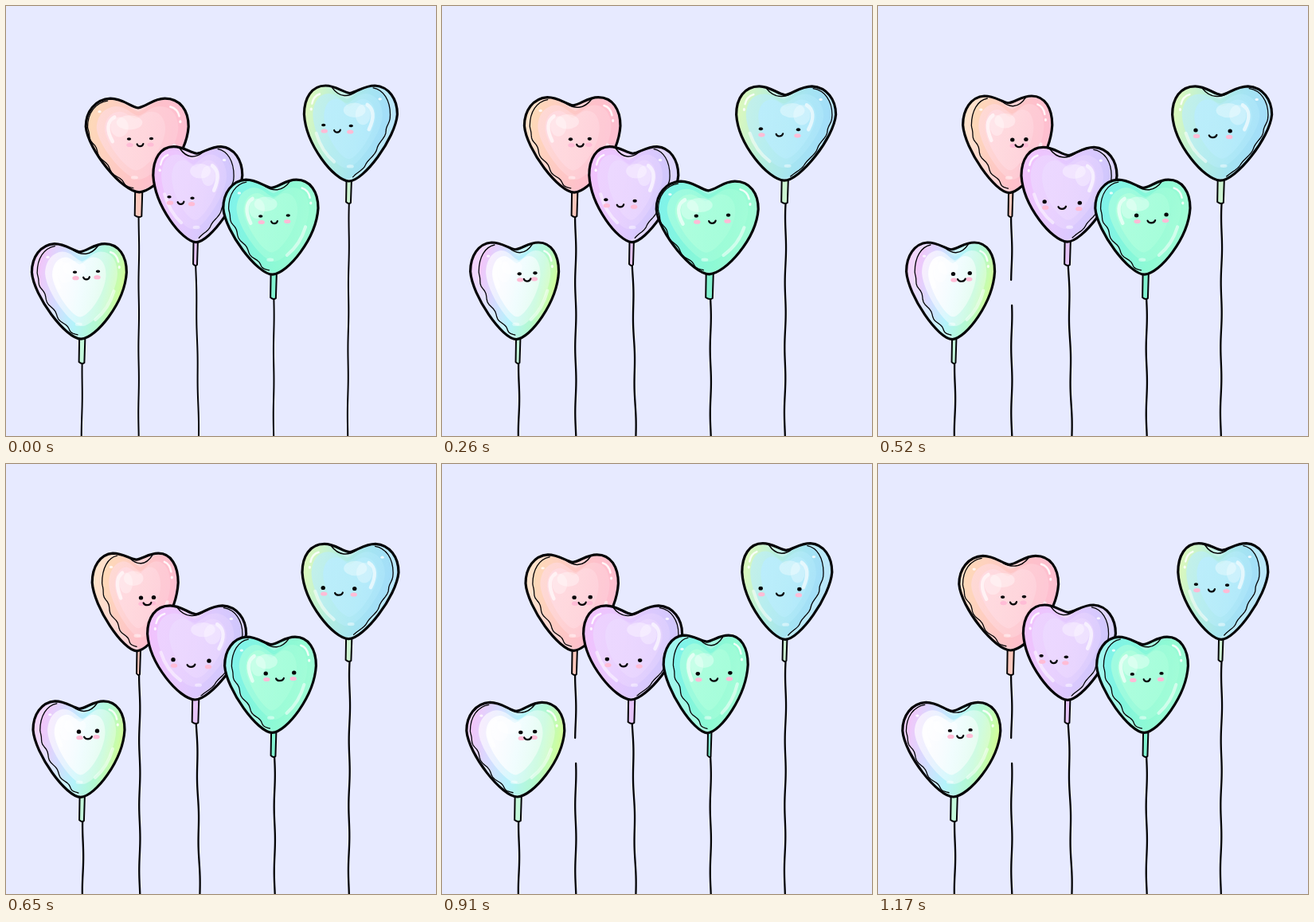
An HTML page with a canvas that plays this animation: 540 px wide and 540 px high, repeating every 1.3 s.

```html
<!DOCTYPE html>
<html lang="en">
<head>
<meta charset="utf-8">
<title>Heart balloons</title>
<style>
  html, body { margin: 0; width: 100%; height: 100%; overflow: hidden; background: #e7eaff; }
  canvas { display: block; width: 540px; height: 540px; }
</style>
</head>
<body>
<canvas id="stage" width="540" height="540"></canvas>
<script>
const ctx = document.getElementById('stage').getContext('2d');
const STEP = 130, STEPS = 10;
const INK = '#050507', SKY = '#e7eaff', BLUSH = '#ffbcd6';

// wide: step at which the balloon faces forward.
// left, right, top, bottom: edges facing forward and turned away.
// eyes, gap, eyeY: mean, swing once per loop, swing twice per loop.
const balloons = [
  { wide: 8, left: [28, 36], right: [157, 145], top: [299, 295], bottom: [419, 420],
    tab: [95.5, 449], lean: -.5, eyes: [105, 1, 3], gap: [22, -3, -4], eyeY: [336, 1, .8], tilt: -1,
    colors: ['#f1c6fa', '#d5dcff', '#b4f3fb', '#b3f9d0', '#d9ff8c'], glow: '255,255,255', tint: '#c3f8da' },
  { wide: 0, left: [99, 107], right: [230, 217], top: [115, 111], bottom: [235, 236],
    tab: [166.5, 265], lean: 0, gapped: true, eyes: [174, 4.5, 1], gap: [22, -6, 0], eyeY: [167.5, .5, 0], tilt: -.5,
    colors: ['#fed9b8', '#fecbc3', '#fec0cb', '#febfd2'], glow: '255,219,226', tint: '#fcc8bd' },
  { wide: 6, flip: true, left: [174, 186], right: [304, 296], top: [177, 175], bottom: [297, 298],
    tab: [238, 326], lean: 4, eyes: [226, 6.5, 0], gap: [38, 8, 1], eyeY: [243.5, 3, .8], tilt: 1.5,
    colors: ['#f1c2fd', '#e8c8ff', '#dac9fe', '#cdc6fc'], glow: '236,217,255', tint: '#e5c4f6' },
  { wide: 2, left: [268, 277], right: [398, 385], top: [219, 214], bottom: [338, 339],
    tab: [336, 368], lean: 0, eyes: [340.5, 3.5, 0], gap: [38, .5, 3], eyeY: [263.5, -.5, 0], tilt: -1,
    colors: ['#80f3ea', '#83f6dc', '#8ffad4', '#a3fdd6'], glow: '176,255,221', tint: '#82f2d0' },
  { wide: 3, flip: true, left: [366, 378], right: [497, 489], top: [100, 98], bottom: [220, 222],
    tab: [430.5, 248], lean: -1.5, eyes: [421, 1, 4], gap: [43, 2.5, 6], eyeY: [154, 3, 1.5], tilt: 1,
    colors: ['#daf8bd', '#b4eedf', '#a5e4f2', '#a2dcfb'], glow: '186,237,253', tint: '#ccf3d1' }
];

const mix = (a, b, t) => a + (b - a) * t;

// Maps unit coordinates into a box, mirrored when flipped.
const mapper = ({ x, y, w, h, flip }) => (u, v) => [x + w * (flip ? 1 - u : u), y + h * v];

function inset(b, l, t, r, bot) {
  if (b.flip) [l, r] = [r, l];
  return { x: b.x + b.w * l, y: b.y + b.h * t, w: b.w * (1 - l - r), h: b.h * (1 - t - bot), flip: b.flip };
}

function trace(at, x, y, ...curves) {
  const path = new Path2D();
  path.moveTo(...at(x, y));
  for (let i = 0; i < curves.length; i += 6) {
    const [a, b, c, d, e, f] = curves.slice(i, i + 6);
    path.bezierCurveTo(...at(a, b), ...at(c, d), ...at(e, f));
  }
  return path;
}

function heart(box, notch) {
  const path = trace(mapper(box), .51, notch,
    .43, notch * .85, .36, 0, .24, 0,
    .09, .01, 0, .14, 0, .3,
    .02, .55, .36, 1, .52, 1,
    .68, .99, .98, .62, 1, .3,
    1, .13, .92, 0, .77, 0,
    .66, 0, .59, notch * .85, .51, notch);
  path.closePath();
  return path;
}

function stroke(path, width, color = INK) {
  ctx.lineWidth = width;
  ctx.strokeStyle = color;
  ctx.stroke(path);
}

function oval(x, y, rx, ry, color) {
  ctx.fillStyle = color;
  ctx.beginPath();
  ctx.ellipse(x, y, rx, ry, 0, 0, Math.PI * 2);
  ctx.fill();
}

function fade(box, colors) {
  const g = ctx.createLinearGradient(box.x, box.y + box.h * .35, box.x + box.w, box.y + box.h * .55);
  colors.forEach((c, i) => g.addColorStop(i / (colors.length - 1), c));
  return g;
}

function fillHeart(box, notch, colors) {
  ctx.fillStyle = fade(box, colors);
  ctx.fill(heart(box, notch));
}

function bezier(t, a, b, c, d) {
  const s = 1 - t;
  return s * s * s * a + 3 * s * s * t * b + 3 * s * t * t * c + t * t * t * d;
}

// Wavy seam along the near edge of the front face.
function drawSeam(box) {
  const at = mapper(box);
  const path = trace(at, .2, .01, .08, .03, 0, .14, 0, .3);
  for (let t = 0; t <= .9; t += .03) {
    const [x, y] = at(bezier(t, 0, .02, .36, .52), bezier(t, .3, .55, 1, 1));
    const wave = Math.sin(t * 30) * 1.3 * Math.min(1, t * 5);
    path.lineTo(x + wave, y - wave * .4);
  }
  stroke(path, 1.3);
}

function drawThread(b, style) {
  const [x, y0] = b.tab, wavy = style > 0;
  const top = x + (wavy ? 1.2 : .4), bottom = x + b.lean + (wavy ? 1.4 : 0);
  const path = new Path2D();
  let pen = false;
  for (let y = y0 - 1; y <= 544; y += 4) {
    const hidden = b.gapped && style === 1 && y > 345 && y < 374;
    const px = mix(top, bottom, (y - y0) / (540 - y0)) + (wavy ? .6 : .3) * Math.sin(y / 13 + x);
    if (!hidden) pen ? path.lineTo(px, y) : path.moveTo(px, y);
    pen = !hidden;
  }
  stroke(path, wavy ? 2.3 : 2);
}

function drawTab(b, turn, foot) {
  const [x, y] = b.tab, r = mix(4.3, 2, turn);
  const path = new Path2D();
  path.moveTo(x - r, foot - 3);
  path.lineTo(x - r - .5, y - 2);
  path.quadraticCurveTo(x, y + 1.5, x + r - .5, y - 1);
  path.lineTo(x + r + .5, foot - 3);
  ctx.fillStyle = b.tint;
  ctx.fill(path);
  stroke(path, 2);
}

function drawShine(box) {
  const at = mapper(box);
  const white = a => `rgba(255,255,255,${a})`;
  const spot = (u, v, rx, ry, a) => oval(...at(u, v), rx, ry, white(a));
  spot(.42, .25, box.w * .13, box.h * .08, .35);
  spot(.32, .3, box.w * .09, box.h * .11, .3);
  stroke(trace(at, .27, .19, .19, .24, .19, .34, .25, .46), 4.5, white(.65));
  stroke(trace(at, .87, .5, .83, .63, .75, .74, .66, .81), 4, white(.55));
  stroke(trace(at, .83, .075, .88, .09, .91, .13, .92, .18), 2.5, white(.85));
  spot(.93, .24, 1.6, 2, .85);
  spot(.12, .13, 2.2, 1.6, .8);
  spot(.47, .86, 4.5, 2.2, .45);
}

function drawFace(b, i) {
  const angle = i / STEPS * Math.PI * 2;
  const once = -Math.cos(angle), twice = -Math.cos(2 * angle);
  const swing = ([mean, a, c]) => mean + a * once + c * twice;
  const x = swing(b.eyes), y = swing(b.eyeY), half = swing(b.gap) / 2;
  for (const side of [-1, 1]) {
    const ey = y + (side > 0 ? b.tilt : 0);
    oval(x + side * (half - 1), ey + 7.5, 4.2, 2.6, BLUSH);
    oval(x + side * half, ey, 2.7, 2.2 + .4 * once, INK);
  }
  const w = 4.4 + .5 * once;
  stroke(trace((u, v) => [x + u * w, y + 8 + v], -1, -1.5, -.7, 2.2, .7, 2.2, 1, -2), 2.2);
}

function drawBalloon(b, i) {
  const away = Math.abs(i - b.wide);
  const turn = Math.min(away, STEPS - away) / (STEPS / 2);
  const [left, right, top, bottom] = [b.left, b.right, b.top, b.bottom].map(([p, q]) => mix(p, q, turn));
  const box = { x: left + 1.2, y: top + 1.2, w: right - left - 2, h: bottom - top - 2.4, flip: b.flip };
  const notch = mix(.1, .065, turn);
  const outline = heart(box, notch);
  const front = inset(box, mix(.018, .115, turn), .015, .012, .02);
  const glow = (a, c) => [a, c].map(alpha => `rgba(${b.glow},${alpha})`);

  drawTab(b, turn, bottom);
  ctx.save();
  ctx.clip(outline);
  fillHeart(box, notch, b.colors);
  fillHeart(box, notch, ['rgba(255,255,255,.25)', 'rgba(255,255,255,.25)']);
  fillHeart(front, .13, b.colors);
  fillHeart(inset(front, .09, .07, .09, .12), .13, glow(.65, .3));
  fillHeart(inset(front, .17, .13, .22, .22), .12, glow(.9, .45));
  drawShine(front);
  drawSeam(front);
  if (turn) stroke(trace(mapper(box), .44, notch * .8, .52, .12, .62, .13, .7, .02), 1.5);
  ctx.restore();
  stroke(outline, 3.2);
  drawFace(b, i);
}

function draw(i) {
  ctx.fillStyle = SKY;
  ctx.fillRect(0, 0, 540, 540);
  balloons.forEach(b => drawThread(b, i % 8 % 3));
  balloons.forEach(b => drawBalloon(b, i));
}

ctx.lineCap = ctx.lineJoin = 'round';
const start = performance.now();
let shown = 0;
draw(0);

function tick() {
  const i = Math.floor((performance.now() - start) / STEP) % STEPS;
  if (i !== shown) draw(shown = i);
  requestAnimationFrame(tick);
}
requestAnimationFrame(tick);
</script>
</body>
</html>
```
